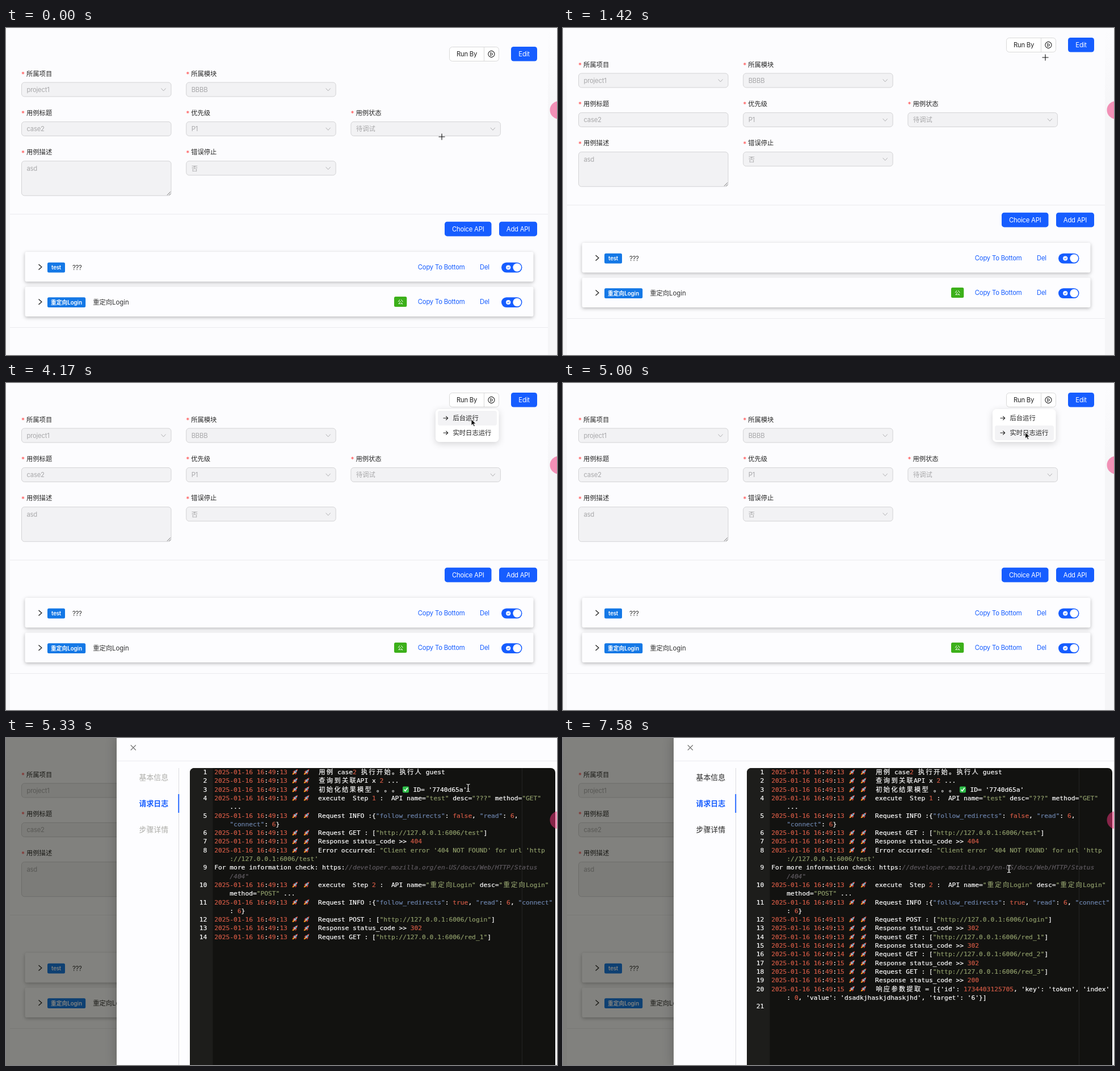
These frames come from a looping animation (971 by 577 pixels, 8 s). An HTML page:

```html
<!DOCTYPE html>
<html lang="zh-CN">
<head>
<meta charset="utf-8">
<title>Case detail</title>
<style>
html, body { margin: 0; width: 100%; height: 100%; overflow: hidden; background: #fcfcfe; }
svg { display: block; width: 971px; height: 577px; }
text { font-family: Inter, "Noto Sans CJK SC", "Noto Sans CJK", sans-serif; font-size: 11.3px; fill: #262626; }
.la { letter-spacing: -.22px; }
.code text { font-family: "DejaVu Sans Mono", "Noto Sans CJK SC", "Noto Sans CJK", monospace; color: #fff; }
.code text, .code tspan { fill: currentColor; stroke: currentColor; stroke-width: .2px; }
.code .st { color: #8f9d6a; }
.code .nu { color: #d25a45; }
.code .ky { color: #6c83ab; }
.code .cm { color: #5f5a60; font-style: italic; }
.card { filter: drop-shadow(0 2px 3px rgba(0,0,0,.27)); }
.pop { filter: drop-shadow(0 3px 6px rgba(0,0,0,.16)); }
.side { filter: drop-shadow(-4px 0 8px rgba(0,0,0,.16)); }
</style>
</head>
<body>
<svg id="stage" viewBox="0 0 971 577"></svg>
<script>
const BLUE = '#165dff';
const esc = s => s.replace(/&/g, '&amp;').replace(/</g, '&lt;').replace(/>/g, '&gt;');

// y is the vertical middle of the text
function txt(x, y, s, { size = 11.3, fill = '#262626', mid = false, bold = 400 } = {}) {
  const latin = /^[ -~]+$/.test(s) ? 'class="la"' : '';
  return `<text ${latin} x="${x}" y="${y + size * .36}" text-anchor="${mid ? 'middle' : 'start'}"
    style="font-size:${size}px;fill:${fill};font-weight:${bold}">${esc(s)}</text>`;
}
const rect = (x, y, w, h, fill, r = 0, more = '') =>
  `<rect x="${x}" y="${y}" width="${w}" height="${h}" rx="${r}" fill="${fill}" ${more}/>`;
const line = (d, color, w = 1) =>
  `<path d="${d}" fill="none" stroke="${color}" stroke-width="${w}"/>`;
const button = (x, y, w, s) =>
  rect(x, y, w, 25.6, BLUE, 4.5) + txt(x + w / 2, y + 12.8, s, { fill: '#fff', mid: true });

// ---- form page ----
function field(col, row, label, value, kind = 'select') {
  const x = 27 + 290.2 * col, y = 80.5 + 69.4 * row;
  const h = kind === 'area' ? 61 : 25;
  let s = txt(x, y + 1, '*', { fill: '#ff4d4f', size: 12 }) + txt(x + 9, y, label) +
    rect(x + .5, y + 15.5, 263.5, h, '#f2f2f4', 5, 'stroke="#d3d3d5"') +
    txt(x + 9.5, y + 28.2, value, { fill: '#a8a8aa' });
  if (kind === 'select') s += line(`M${x + 246.5} ${y + 26}l4 4.4 4-4.4`, '#b0b0b2');
  if (kind === 'area') s += line(`M${x + 257} ${y + 75.5}l6-6M${x + 260.5} ${y + 75.5}l2.5-2.5`, '#666', .9);
  return s;
}

function card(y, tag, tagW, title, shared) {
  const m = y + 27.5;
  return rect(33.5, y, 896, 52.5, '#fdfdff', 3, 'class="card"') +
    line(`M57.5 ${m - 5.6}l5.4 4.8-5.4 4.8`, '#222', 1.3) +
    rect(73, m - 8.8, tagW, 17.8, '#1478e6', 2.5) +
    txt(73 + tagW / 2, m + .3, tag, { size: 9.7, fill: '#fff', mid: true, bold: 600 }) +
    txt(86 + tagW, m, title, { fill: '#333' }) +
    (shared ? rect(684, m - 10, 22.3, 18, '#3cb01a', 2.5) +
      txt(695.2, m - .8, '公', { size: 9.8, fill: '#fff', mid: true }) : '') +
    txt(725.8, m - .8, 'Copy To Bottom', { fill: BLUE }) + txt(835, m - .8, 'Del', { fill: BLUE }) +
    rect(873, m - 8.8, 36.5, 17.8, BLUE, 8.9) +
    `<circle cx="900.7" cy="${m}" r="7.3" fill="#fff"/><circle cx="885.2" cy="${m}" r="4.1" fill="#fff"/>` +
    line(`M883.3 ${m}l1.4 1.5 2.4-2.9`, BLUE);
}

const play = c => `<circle cx="855.4" cy="46" r="5.6" fill="none" stroke="${c}" stroke-width="1.1"/>
  <path d="M853.8 43.2l4.2 2.8-4.2 2.8z" fill="none" stroke="${c}"/>`;

function reload(x, y, c) {
  return line(`M${x + 4.3} ${y - 2.6}A5 5 0 1 0 ${x + 4.8} ${y + 1.6}`, c, 1.2) +
    `<path d="M${x + 5.6} ${y - 4.8}v3.6h-3.6z" fill="${c}"/>`;
}

function historyBlock() {
  const heads = [[53, '结果ID'], [127, '执行用例'], [247, '测试结果'], [376, '进度'],
    [564, '状态'], [658, '执行人'], [779, '操作']];
  let gear = '';
  for (let i = 0; i < 8; i++) gear += `<path d="M907 602.2v2" stroke="#222" stroke-width="2" transform="rotate(${i * 45} 907 608.3)"/>`;
  return txt(47, 608.5, '调试历史', { size: 16, fill: '#ff9100', bold: 700 }) +
    rect(661, 595.6, 88.3, 25.6, BLUE, 4.5) + reload(679, 608.3, '#fff') + txt(691.3, 608.3, '开始轮询', { fill: '#fff' }) +
    button(756, 595.6, 83, 'Remove All') + reload(855, 608.3, '#222') +
    line('M876 603h10M876 613.6h10M881 604.5v7.6M879 606.2l2-2 2 2M879 610.4l2 2 2-2', '#222', 1.1) +
    gear + '<circle cx="907" cy="608.3" r="4.6" fill="#fcfcfe" stroke="#222" stroke-width="1.1"/><circle cx="907" cy="608.3" r="1.8" fill="none" stroke="#222"/>' +
    rect(46, 636, 870, 40, '#fafafc') +
    heads.map(([x, s], i) => txt(x, 652.5, s, { bold: 600 }) + (i ? rect(x - 7, 643, 1, 18, '#ececee') : '')).join('');
}

const page = `<g id="page">` +
  rect(781.5, 33.5, 87, 25, '#fff', 5, 'stroke="#d9d9d9"') + rect(842, 34, 1, 24, '#d9d9d9') +
  txt(812, 46, 'Run By', { mid: true }) + play('#222') +
  `<g id="hot"><path d="M842.5 33.5h21a5 5 0 0 1 5 5v15a5 5 0 0 1-5 5h-21z" fill="#fff" stroke="#4080ff"/>${play('#4080ff')}</g>` +
  button(890, 33, 46, 'Edit') +
  field(0, 0, '所属项目', 'project1') + field(1, 0, '所属模块', 'BBBB') +
  field(0, 1, '用例标题', 'case2', 'input') + field(1, 1, '优先级', 'P1') + field(2, 1, '用例状态', '待调试') +
  field(0, 2, '用例描述', 'asd', 'area') + field(1, 2, '错误停止', '否') +
  rect(7, 328, 948, 1, '#ebebee') +
  button(773, 341.8, 82.5, 'Choice API') + button(869, 341.8, 67, 'Add API') +
  card(395, 'test', 31, '???', false) + card(456.5, '重定向Login', 67.2, '重定向Login', true) +
  rect(7, 528, 948, 1, '#ebebee') + historyBlock() + `</g>`;

// ---- dropdown ----
const item = (y, s) => rect(761, y - 13, 104, 26, '#f3f3f5', 4, 'class="item"') +
  line(`M770.5 ${y}h8M775.3 ${y - 3.4}l3.4 3.4-3.4 3.4`, '#222', 1.1) + txt(787.5, y, s);
const menu = `<g id="menu">${rect(757, 46, 111.5, 58, '#fff', 6.5, 'class="pop"')}${item(62, '后台运行')}${item(88, '实时日志运行')}</g>`;

// ---- log ----
const get = s => `Request GET : ["http://127.0.0.1:6006/${s}"]`;
const status = n => `Response status_code >> ${n}`;
const step = (n, s) => `execute  Step ${n} :  API name="${s}" desc=`;
const info = b => `Request INFO :{"follow_redirects": ${b}, "read": 6, `;
// seconds, first row, wrapped row, class of the wrapped row
const log = [
  [13, '用例 case2 执行开始。执行人 guest'],
  [13, '查询到关联API x 2 ...'],
  [13, "初始化结果模型 。。。 ✅ ID= '7740d65a'"],
  [13, step(1, 'test') + '"???" method="GET"', '...'],
  [13, info('false'), '"connect": 6}'],
  [13, get('test')],
  [13, status(404)],
  [13, `Error occurred: "Client error '404 NOT FOUND' for url 'http`, "://127.0.0.1:6006/test'", 'st'],
  [0, 'For more information check: https://developer.mozilla.org/en-US/docs/Web/HTTP/Status', '/404"', 'cm'],
  [13, step(2, '重定向Login') + '"重定向Login"', 'method="POST" ...'],
  [13, info('true') + '"connect"', ': 6}'],
  [13, 'Request POST : ["http://127.0.0.1:6006/login"]'],
  [13, status(302)], [13, get('red_1')],
  [14, status(302)], [14, get('red_2')],
  [15, status(302)], [15, get('red_3')],
  [15, status(200)],
  [15, "响应参数提取 = [{'id': 1734403125705, 'key': 'token', 'index'",
    ": 0, 'value': 'dsadkjhaskjdhaskjhd', 'target': '6'}]"],
  [0, '']
];
const TOKEN = /"[^"]*"?|'[^']*'|\/\/.*|-?\d+|true|false|[🚀✅]|[^\s\d"'/\-🚀✅]+|./gu;
const CELL = 6.775, LEFT = 367.2, ROW = 15.3;

function kind(t) {
  if (/^"(follow_redirects|read|connect)"$/.test(t)) return 'ky';
  if (t[0] === '"') return 'st';
  if (t.startsWith('//')) return 'cm';
  return /^(-?\d+|true|false)$/.test(t) ? 'nu' : '';
}

function codeRow(s, col, y, cls) {
  let spans = '', icons = '';
  for (const [t] of s.matchAll(TOKEN)) {
    if (t === ' ') { col++; continue; }
    if (t === '🚀' || t === '✅') {
      icons += `<use href="#${t === '✅' ? 'ok' : 'rocket'}" x="${LEFT + CELL * col}" y="${y}"/>`;
      col += t === '✅' ? 1.7 : 2;
      continue;
    }
    const xs = [...t].map(c => {
      const w = /[\u2e80-\u9fff]/.test(c) ? 2 : 1;
      const x = LEFT + CELL * col + (w - 1) * 1.15;
      col += w;
      return x.toFixed(1);
    });
    spans += `<tspan class="${cls || kind(t)}" x="${xs.join(' ')}">${esc(t)}</tspan>`;
  }
  return `<text y="${y}">${spans}</text>${icons}`;
}

let y = 64;
const logRows = log.map(([sec, first, wrap, cls], i) => {
  const head = sec ? `2025-01-16 16:49:${sec} 🚀 🚀  ` : '';
  let s = `<text x="354.3" y="${y}" text-anchor="end">${i + 1}</text>` + codeRow(head + first, 0, y);
  y += ROW;
  if (wrap) { s += codeRow(wrap, 4, y, cls); y += ROW; }
  return `<g class="entry">${s}</g>`;
}).join('');

// ---- drawer ----
const drawer = `<rect id="mask" width="971" height="577" fill="#080800"/><g id="drawer">` +
  rect(195, 0, 800, 577, '#fdfdff', 0, 'class="side"') + `<g id="body">` +
  rect(304, 53, 1, 600, '#dcdce0') + rect(303.4, 99, 1.8, 33, BLUE) +
  ['基本信息', '请求日志', '步骤详情'].map((s, i) =>
    `<g class="tab">${txt(234.5, 69.4 + 46 * i, s, { size: 12.9, fill: BLUE, bold: i === 1 ? 600 : 400 })}</g>`).join('') +
  `<clipPath id="round">${rect(324, 53, 644, 640, '#000', 8)}</clipPath><g class="code" clip-path="url(#round)">` +
  rect(324, 53, 644, 640, '#121210') + rect(324, 53, 40.5, 640, '#1d1d1b') + rect(909, 53, 1, 640, '#232323') +
  logRows + `</g></g>` +
  rect(195, 0, 800, 40, '#fdfdff') + rect(195, 40, 800, 1, '#ebebf0') +
  line('M219.8 12.5l9 9M228.8 12.5l-9 9', '#777', 1.2) + `</g>`;

const tip = `<g id="tip">${rect(784.5, 246.5, 45.5, 15.5, '#2a2a2c', 1, 'stroke="#4a4a4c"')}${txt(789.2, 253.6, '运行结果', { size: 9, fill: '#f2f2f2' })}</g>`;

const pointers = `<g id="cross" class="ptr">${line('M-5.5 0h11M0-5.5v11', '#111', 1.1)}</g>
  <path id="hand" class="ptr" d="M-1 1.2q1-1.8 2 0v4.6l1.2-.6 1.2.7 1.2-.3 1.1.8 1.2 0q1.2.5 1 2.5-.2 3-1.4 5.6h-5.6q-1.4-2.2-4.2-5.4-.6-1.8 1-1.4l1.3 1z" fill="#fff" stroke="#111"/>
  <path id="arrow" class="ptr" d="M0 0v11l2.6-2.4 1.8 4 1.9-.8-1.8-3.9h3.6z" fill="#111" stroke="#fff" stroke-width=".8"/>
  <g id="beam" class="ptr">${line('M-3-6.5q3 0 3 2v9q0 2-3 2M3-6.5q-3 0-3 2M0 4.5q0 2 3 2M-1.8 2h3.6', '#e4e4e4', 1.2)}</g>`;

const stage = document.getElementById('stage');
stage.innerHTML = `<defs>
  <linearGradient id="edge" x2="0" y2="1"><stop stop-color="#fcfcfe"/><stop offset=".28" stop-color="#f5f5f7"/></linearGradient>
  <g id="rocket"><path d="M1.8.8q.2-3.4 2.4-3.8l1.8 1.8q-.8 2-4.2 2z" fill="#f08a1c"/>
    <path d="M2.2-3.8l2.8-2.6 2 .2-2.4 3zM7.4 1l2.2-3-.4-2-2.6 2.4z" fill="#d8342c"/>
    <path d="M4.2-2.8q1.8-4.600 6.800-6-.4 4.800-5.200 7.600z" fill="#b4bcc4"/>
    <path d="M8.800-8q1.200-.9 2.700-1.100-.1 1.700-1 3z" fill="#d8342c"/>
    <circle cx="7.800" cy="-5.300" r="1.100" fill="#2f6fa8"/></g>
  <g id="ok">${rect(-.2, -9.2, 11, 11, '#2fbf4a', 2)}${line('M2.3-3.5l2.2 2.3 4-5.5', '#fff', 1.6)}</g>
  </defs>` +
  rect(0, 0, 971, 577, 'url(#edge)') + rect(7, 0, 948, 577, '#fcfcfe') +
  page + menu + drawer +
  `<circle cx="974.5" cy="144.8" r="16" fill="#f0347c" opacity=".52"/>` + tip + pointers;

// ---- motion, in twelfths of a second ----
const scroll = [[0, 0], [3, -16], [5, -50], [7, -80.5], [8, -50], [9, -16]];
const bodyScroll = [[0, 0], [81, -.8], [83, -14], [84, -24], [88, -14], [89, -6], [90, -2], [91, 0]];
const path = [
  [0, 'cross', 768, 192], [14, 'cross', 809, 90], [16, 'cross', 835, 66], [17, 'cross', 850, 52],
  [18, 'cross', 856.5, 47], [20, 'hand', 855, 29], [25, 'hand', 858, 31], [30, 'hand', 855.5, 29.5],
  [38, 'hand', 847, 40], [40, 'arrow', 838, 54], [41, 'arrow', 827, 60], [42, 'arrow', 824, 61],
  [44, 'arrow', 821, 61], [50, 'arrow', 820, 64], [51, 'arrow', 818, 69], [53, 'arrow', 816, 79],
  [54, 'arrow', 814.5, 87], [63, 'beam', 814.5, 88], [76, 'beam', 813.5, 115], [78, 'beam', 786, 231]
];
const at = (track, n) => track.filter(k => k[0] <= n).pop();
const ramp = (n, a, b) => Math.min(1, Math.max(0, (n - a) / (b - a)));
const smooth = u => u * u * (3 - 2 * u);

const $ = id => document.getElementById(id);
const all = c => [...stage.querySelectorAll(c)];
const show = (el, on) => el.setAttribute('display', on ? 'inline' : 'none');
const move = (el, x, y) => el.setAttribute('transform', `translate(${x} ${y})`);
const entries = all('.entry'), tabs = all('.tab text'), items = all('.item'), ptrs = all('.ptr');

function draw(ms) {
  const n = Math.floor((ms % 8000 + 4) * 12 / 1000);
  move($('page'), 0, at(scroll, n)[1]);
  $('hot').setAttribute('opacity', ramp(n, 29, 32) * (1 - ramp(n, 39, 42)));

  const open = smooth(ramp(n, 29, 33)), fade = 1 - ramp(n, 60, 63);
  show($('menu'), open * fade > 0);
  $('menu').setAttribute('opacity', open * fade);
  $('menu').setAttribute('transform', `translate(0 46) scale(1 ${.8 + .2 * open * fade}) translate(0 -46)`);
  show(items[0], n >= 40 && n < 53);
  show(items[1], n >= 53);

  const slide = smooth(ramp(n, 60, 64));
  $('mask').setAttribute('opacity', .5 * slide);
  show($('drawer'), slide > 0);
  move($('drawer'), 776 * (1 - slide), 0);
  move($('body'), 0, at(bodyScroll, n)[1]);
  entries.forEach((el, i) => show(el, n >= (i < 14 ? 63 : i < 16 ? 74 : 86)));
  for (const el of [tabs[0], tabs[2]]) el.style.fill = n >= 86 ? '#262626' : '#acaca8';
  show($('tip'), n >= 81 && n < 83);

  const [, type, x, y] = at(path, n);
  ptrs.forEach(el => show(el, el.id === type));
  move($(type), x, y);
}

const start = performance.now();
function tick() {
  draw(performance.now() - start);
  requestAnimationFrame(tick);
}
tick();
</script>
</body>
</html>
```
